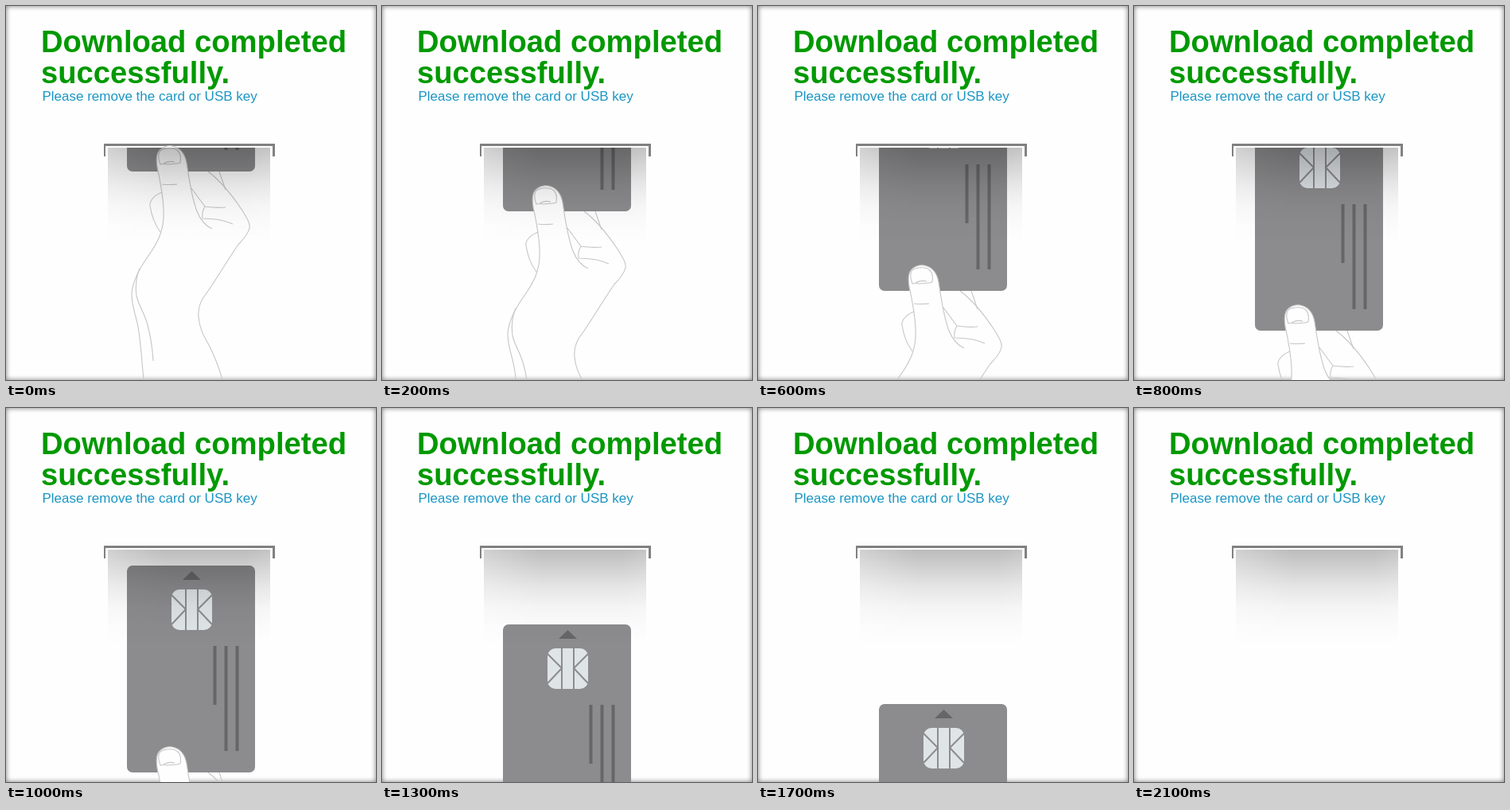
These frames come from a looping animation (465 px wide and 470 px high, 2.2 s). An HTML page:

```html
<!DOCTYPE html>
<html lang="en">
<head>
<meta charset="utf-8">
<title>Remove the card</title>
<style>
  html, body { margin: 0; width: 100%; height: 100%; overflow: hidden; background: #fefefe; }
  body { box-shadow: inset 0 0 6px #777; }
  svg { display: block; }
  text { font-family: "Liberation Sans", Arial, sans-serif; }
  .title { font-size: 38.2px; font-weight: bold; fill: #090; }
  .line { fill: none; stroke: #c6c6c6; stroke-width: 1.1; stroke-linejoin: round; }
</style>
</head>
<body>
<svg width="465" height="470" viewBox="0 0 465 470">
  <defs>
    <clipPath id="slot"><path d="M0 178H465V470H0z"/></clipPath>
    <linearGradient id="fade" x2="0" y2="1">
      <stop offset="0" stop-opacity=".26"/>
      <stop offset=".2" stop-opacity=".175"/>
      <stop offset=".4" stop-opacity=".095"/>
      <stop offset=".6" stop-opacity=".04"/>
      <stop offset=".8" stop-opacity=".013"/>
      <stop offset="1" stop-opacity="0"/>
    </linearGradient>
    <linearGradient id="sides">
      <stop offset="0" stop-color="#fff" stop-opacity=".7"/>
      <stop offset=".35" stop-color="#fff"/>
      <stop offset=".85" stop-color="#fff"/>
      <stop offset="1" stop-color="#fff" stop-opacity=".87"/>
    </linearGradient>
    <mask id="soft" style="mask-type: alpha"><path fill="url(#sides)" d="M128 178H332V298H128z"/></mask>
  </defs>

  <text class="title" x="44" y="58">Download completed</text>
  <text class="title" x="44" y="97">successfully.</text>
  <text x="45.5" y="119" font-size="17" fill="#1a96c4">Please remove the card or USB key</text>

  <path fill="#808080" d="M123 173H338V189H335V176H125V189H123z"/>

  <!-- palm and fingers, behind the card -->
  <g class="line moving">
    <path d="M254 208C270 220 287 242 297 257C303 267 307 273 306 279C304 288 297 294 291 301C278 320 266 341 252 361C245 369 241 380 242 391C243 404 248 414 255 426C262 440 268 455 272 470"/>
    <path d="M268 208Q272 220 276 231"/>
    <path d="M233 229L250 252Q264 254 276 253M250 252Q246 258 247 267Q271 267 285 274"/>
    <path d="M196 234C186 238 180 245 181 251C183 264 188 276 194 284"/>
    <path d="M183 308C171 325 159 343 158 362C158 380 165 392 167 410C170 430 171 450 173 470"/>
    <path d="M168 330C163 341 162 358 165 368C168 378 174 386 178 401C182 416 184 430 185 446"/>
  </g>

  <g clip-path="url(#slot)">
    <g id="card">
      <rect x="152" width="161" height="260" rx="7" fill="#8c8c8e"/>
      <path fill="#666668" d="M233.5 7L245 18H222zM260.5 101h4v74h-4zM274.5 101h4v132h-4zM288.5 101h4v132h-4z"/>
      <rect x="208" y="30" width="51" height="51" rx="10" fill="#dfe4e6"/>
      <path fill="none" stroke="#8c8c8e" stroke-width="2" d="M226 30V81M241 30V81M208 37L226 55L208 74M259 37L241 55L259 74"/>
    </g>
  </g>

  <!-- thumb, in front of the card -->
  <g class="line moving">
    <path fill="#fefefe" d="M183 308C190 297 197 285 198 266C199 245 195 228 192 212C189 200 188 190 191 184C195 177 203 175 209 176C219 178 225 186 227 197C230 216 233 240 240 258C244 268 250 276 259 280"/>
    <path d="M194 199C192 194 191 187 193 183C197 178 211 177 216 182C220 186 220 191 219 197C213 199 208 198 203 199Q198 198 194 199zM198 198Q204 194 212 196M196 224Q206 225 215 224"/>
  </g>

  <path fill="url(#fade)" mask="url(#soft)" d="M128 178H332V298H128z"/>
</svg>
<script>
  const STEP = 100, COUNT = 22;
  const card = document.getElementById("card");
  const hand = document.querySelectorAll(".moving");
  const shift = (el, y) => el.setAttribute("transform", `translate(0 ${y})`);

  function draw() {
    const n = Math.floor(performance.now() / STEP) % COUNT;
    const top = 25 * n - (n > 10 ? 53 : 52);
    shift(card, top);
    hand.forEach(el => shift(el, top + 52));
    requestAnimationFrame(draw);
  }
  draw();
</script>
</body>
</html>
```
